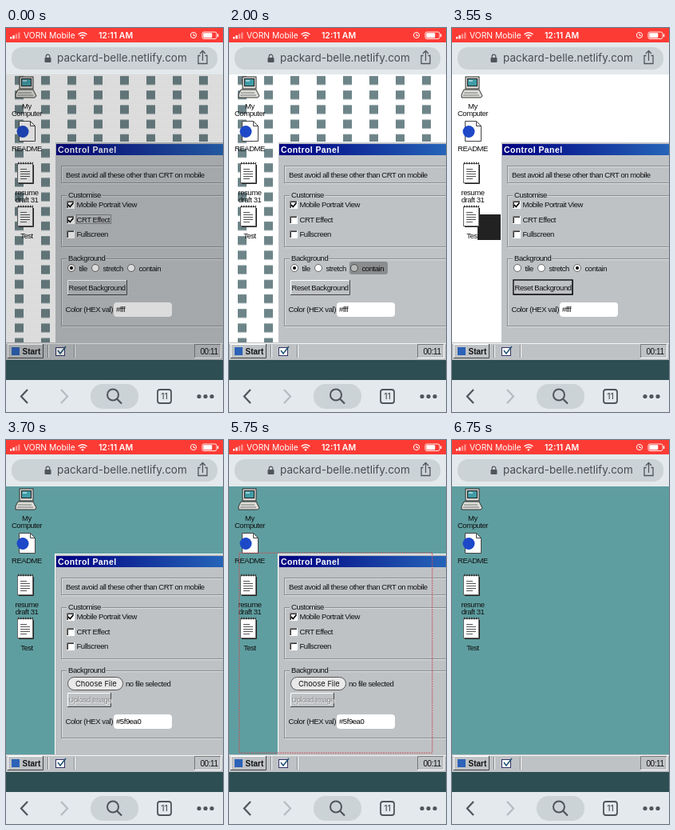
These frames come from a looping animation (272x480 px, 8000 ms). An HTML page:

```html
<!DOCTYPE html>
<html lang="en">
<head>
<meta charset="utf-8">
<style>
html, body { margin: 0; width: 100%; height: 100%; overflow: hidden; }
svg { display: block; width: 272px; height: 480px; }
text { font: 9.5px "Liberation Sans", Arial, sans-serif; letter-spacing: -.44px; white-space: pre; }
.title { font-weight: bold; font-size: 10.5px; letter-spacing: .4px; }
.start { font-weight: bold; font-size: 10px; letter-spacing: 0; }
.clock { font-size: 10px; }
.ui { font: 10.3px Inter, "Liberation Sans", sans-serif; letter-spacing: 0; }
.time { font-weight: 600; font-size: 10.5px; }
.url { font-size: 13.5px; }
.tabs { font-size: 10.5px; font-weight: 500; }
.file { font-size: 9.3px; }
.mid { text-anchor: middle; }
</style>
</head>
<body>
<svg id="stage" viewBox="0 0 272 480"></svg>
<script>
const GREY = '#bfc2c5', TEAL = '#5f9ea0', SLATE = '#4f555a', BAR = '#e3e9ec', PILL = '#cbd3d7';

const rect = (x, y, w, h, fill, more = '') =>
  `<rect x="${x}" y="${y}" width="${w}" height="${h}" fill="${fill}" ${more}/>`;
const path = (d, stroke, width = 1, more = '') =>
  `<path d="${d}" fill="none" stroke="${stroke}" stroke-width="${width}" ${more}/>`;
const circle = (x, y, r, fill, more = '') =>
  `<circle cx="${x}" cy="${y}" r="${r}" fill="${fill}" ${more}/>`;
const text = (x, y, s, cls = '', fill = '#111') =>
  `<text x="${x}" y="${y}" class="${cls}" fill="${fill}">${s}</text>`;
const group = (id, ...parts) => `<g id="${id}">${parts.join('')}</g>`;

// Box with light and dark edges, raised or sunken
function bevel(x, y, w, h, fill = GREY, light = '#fff', dark = '#444') {
  return rect(x, y, w, h, fill) +
    path(`M${x + .5} ${y + h}V${y + .5}H${x + w}`, light) +
    path(`M${x} ${y + h - .5}H${x + w - .5}V${y}`, dark);
}
const sunken = (x, y, w, h, fill) => bevel(x, y, w, h, fill, '#777', '#fff');

function fieldset(x, y, w, h, legend) {
  const frame = (d, color) => rect(x + d, y + d, w, h, 'none', `stroke="${color}"`);
  const label = legend ? rect(x + 7, y - 5, legend.length * 4.9, 10, GREY) + text(x + 9, y + 3, legend) : '';
  return frame(1.5, '#dcdfe1') + frame(.5, '#8b8e91') + label;
}

const tick = y => path(`M78 ${y + 5}l2.3 2.5 4.2-5`, '#000', 1.8);
const checkbox = (y, label) => sunken(76, y, 10, 10, '#fff') +
  path(`M77.5 ${y + 9}V${y + 1.5}H85`, '#333') + text(88.5, y + 8, label);
const radio = (x, label) =>
  circle(x, 300, 4.5, '#fff', 'stroke="#666"') + text(x + 9.5, 303.5, label);
const separator = x => path(`M${x + .5} 396V412`, '#888') + path(`M${x + 1.5} 396V412`, '#fff');

const computer = rect(17, 61, 17, 15, '#d4d4d0', 'stroke="#333"') +
  rect(19.5, 63.5, 12, 9, '#3f9ba6', 'stroke="#222"') + path('M21 66h5', '#fff') +
  path('M15 77h19l4 8-2 2H12v-4z', '#333', 1, 'style="fill:#deded8"') +
  path('M15 81h17M14 84h20', '#777');

const browserPage = path('M16.5 116.5h14l6 6v19h-20z', '#444', 1, 'style="fill:#fff"') +
  path('M30.5 116.5v6h6', '#444') + circle(21, 129.5, 7.5, '#1d48c8');

function notepad(y) {
  let s = rect(14.5, y + 2.5, 19, 24, '#fff', 'stroke="#666"') + path(`M34.5 ${y + 4}v23.5H16`, '#222');
  s += path(`M15 ${y + 2}H34`, '#333', 2.5, 'stroke-dasharray="1.5 1.5"');
  for (let i = 0; i < 5; i++) s += path(`M18 ${y + 9.5 + i * 3}h${i % 4 ? 12 : 8}`, '#555');
  return s;
}

const defs = `<defs>
  <pattern id="tile" width="33" height="18.2" x="0" y="57" patternUnits="userSpaceOnUse">
    ${rect(11, 3, 11, 11, '#6d8488')}</pattern>
  <pattern id="scan" width="4" height="2" patternUnits="userSpaceOnUse">
    ${rect(0, 0, 4, 2, '#181418', 'opacity=".13"') + rect(0, 0, 4, 1, '#181418', 'opacity=".05"')}</pattern>
  <linearGradient id="bar"><stop stop-color="#000080"/><stop offset="1" stop-color="#2a72c0"/></linearGradient>
</defs>`;

const desktop = rect(0, 57, 272, 337, TEAL) +
  group('white', rect(0, 57, 272, 337, '#fff')) +
  group('tiled', rect(0, 57, 272, 337, 'url(#tile)')) +
  group('contained', rect(32, 233, 32, 32, '#222')) +
  computer + browserPage + notepad(167) + notepad(221) +
  [[101, 'My'], [110, 'Computer'], [154, 'README'], [209, 'resume'], [218, 'draft 31'], [262.5, 'Test']]
    .map(([y, s]) => text(26, y, s, 'mid')).join('');

const panel = group('panel',
  bevel(61, 142, 242, 252), rect(63, 145, 238, 14, 'url(#bar)'),
  text(65, 156, 'Control Panel', 'title', '#fff'),
  bevel(287, 146, 13, 12), path('M290.5 148.5l6 6m0-6l-6 6', '#000', 1.5),
  group('closeTap', rect(284, 143, 19, 18, '#000', 'rx="3" opacity=".3"')),
  fieldset(69, 172, 227, 21), text(75, 186.5, 'Best avoid all these other than CRT on mobile'),
  fieldset(69, 209, 227, 64, 'Customise'),
  checkbox(216, 'Mobile Portrait View'), tick(216),
  checkbox(235, 'CRT Effect'), checkbox(253, 'Fullscreen'),
  group('crtTick', tick(235), rect(88.5, 233.5, 43, 11, 'none', 'stroke="#444" stroke-dasharray="1 1"')),
  fieldset(69, 288, 227, 84, 'Background'),
  group('choices',
    radio(82, 'tile'), radio(112, 'stretch'), radio(157, 'contain'),
    circle(0, 300, 2, '#000', 'id="dot"'),
    bevel(77, 315, 75, 19), text(78.5, 327.5, 'Reset Background')),
  group('containTap', rect(151, 292, 48, 16, '#000', 'rx="3" opacity=".28"')),
  group('resetFocus', rect(77, 315, 74, 18, 'none', 'stroke="#111" stroke-width="1.5"')),
  group('upload',
    rect(77.5, 296.5, 69, 16, '#e9e9ea', 'rx="8" stroke="#555"'),
    text(87, 307.5, 'Choose File', 'ui file'),
    text(150, 307.5, 'no file selected'),
    bevel(77, 316, 55, 18), text(79, 329, 'Upload Image', '', '#fff'), text(78.3, 328.3, 'Upload Image', '', '#888')),
  text(74.5, 355, 'Color (HEX val)'), rect(135, 343, 73, 18, '#fff', 'rx="4"'),
  `<text id="hex" x="138" y="355"></text>`);

const taskbar = rect(0, 393, 272, 23, GREY) + rect(0, 394, 272, 1, '#f4f4f4') +
  bevel(2, 395, 45, 18) + rect(7, 399, 10, 10, '#2c62b8') + text(20.5, 407.5, 'Start', 'start') +
  separator(52) + separator(85) +
  rect(62.5, 399.5, 11, 10, '#fff', 'stroke="#336"') + path('M65 403l3 4 7-9', '#257', 1.6) +
  sunken(236, 395, 34, 18) + text(243.5, 407.5, '00:11', 'clock') + rect(0, 415, 272, 26, '#2d4e53');

const browserTop = rect(0, 0, 272, 58, BAR) + rect(0, 0, 272, 18, '#fd3b35') +
  [0, 1, 2, 3].map(i => rect(5 + i * 3.4, 11 - i * 1.8, 2.3, 2.5 + i * 1.8, '#fff', `opacity="${i > 1 ? .45 : 1}"`)).join('') +
  text(22, 13, 'VORN Mobile', 'ui', '#fff') +
  path('M90.5 8q5.5-4.6 11 0M92.5 10.3q3.5-3 7 0', '#fff', 1.5) + circle(96, 12.3, 1.3, '#fff') +
  text(137.5, 13, '12:11 AM', 'ui time mid', '#fff') +
  circle(235, 9, 3.6, 'none', 'stroke="#fff"') + path('M235 7v2.5h2', '#fff') +
  rect(246, 5, 18, 8.5, 'none', 'rx="2" stroke="#fff" stroke-width=".9"') + rect(247.3, 6.3, 11, 5.9, '#fff', 'rx="1"') +
  rect(265, 7.5, 1.3, 3.5, '#fff') +
  rect(7, 24, 258, 28, PILL, 'rx="13"') +
  rect(48.5, 37, 8, 6, SLATE, 'rx="1"') + path('M50.2 38v-2.5a2.3 2.3 0 0 1 4.6 0V38', SLATE, 1.2) +
  text(64, 42, 'packard-belle.netlify.com', 'ui url', '#484c51') +
  path('M243.5 34.5h-2.5v10h11v-10h-2.5M246.5 41V29M243 32l3.5-3.5 3.5 3.5', SLATE, 1.3);

const browserBottom = rect(0, 440, 272, 40, BAR) +
  path('M27 452l-8 8.5 8 8.5', SLATE, 2.2) + path('M69 452l8 8.5-8 8.5', '#b4bcc1', 2.2) +
  rect(106, 445, 60, 31, PILL, 'rx="15"') +
  circle(134, 458.5, 7, 'none', `stroke="${SLATE}" stroke-width="2"`) + path('M139 463.5l6 6', SLATE, 2.2) +
  rect(190, 452, 17, 17, 'none', `rx="3" stroke="${SLATE}" stroke-width="1.8"`) +
  text(198.5, 464.3, '11', 'ui tabs mid', SLATE) +
  [242, 250, 258].map(x => circle(x, 460.5, 2.6, SLATE)).join('');

const $ = id => document.getElementById(id);
$('stage').innerHTML = defs + desktop + panel +
  group('outline', rect(.5, .5, 242, 250, 'none', 'stroke="#c8505a" stroke-dasharray="2 1"')) +
  taskbar + group('crt', rect(0, 57, 272, 359, 'url(#scan)')) + browserTop + browserBottom;

const show = (id, on) => $(id).style.display = on ? '' : 'none';

function draw(t) {
  const contain = t >= 2050, reset = t >= 3650, moved = t >= 6000;
  show('white', !reset);
  show('tiled', !contain);
  show('contained', contain && !reset);
  show('choices', !reset);
  show('upload', reset);
  show('crtTick', t < 50);
  show('crt', t < 100);
  $('crt').setAttribute('opacity', t < 50 ? 1 : .5);
  $('dot').setAttribute('cx', contain ? 157 : 82);
  $('hex').textContent = reset ? '#5f9ea0' : '#fff';
  show('containTap', t >= 2000 && t < 2100);
  show('resetFocus', t >= 3550 && t < 3650);
  show('closeTap', t >= 6650);
  show('panel', t < 6700);
  $('panel').setAttribute('transform', moved ? 'translate(-60 -2)' : '');

  // The dragged outline advances every 50 ms, then waits for the drop
  const step = Math.min(6, Math.max(0, Math.floor((t - 5550) / 50)));
  show('outline', t >= 5450 && !moved);
  $('outline').setAttribute('transform', `translate(${35 - step * 34 / 6} ${142 - step / 3})`);
}

const begin = performance.now();
function tickFrame() {
  draw((performance.now() - begin) % 8000);
  requestAnimationFrame(tickFrame);
}
tickFrame();
</script>
</body>
</html>
```
